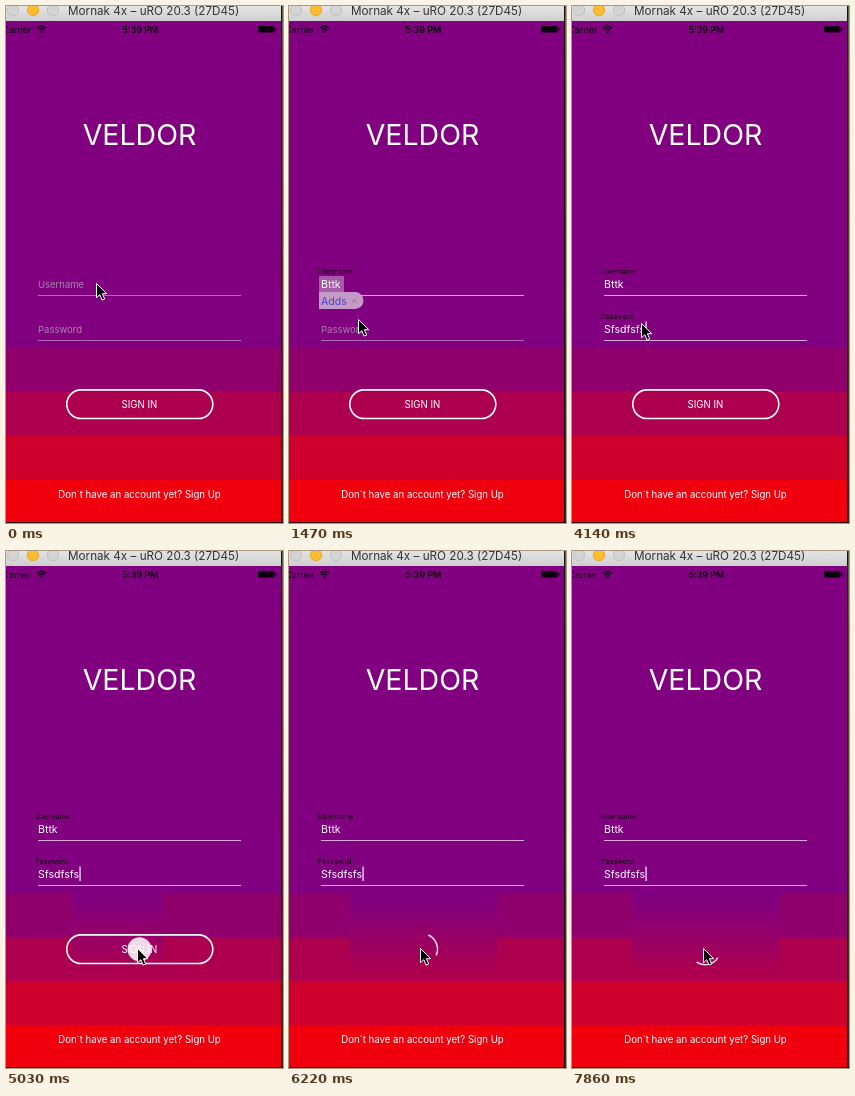
An HTML page that plays this animation: 277x517 px, repeating every 8 s.

```html
<!DOCTYPE html>
<html lang="en">
<head>
<meta charset="utf-8">
<title>Sign in</title>
<style>
html, body { margin: 0; width: 100%; height: 100%; overflow: hidden; background: #800080; }
svg { display: block; width: 277px; height: 517px; font-family: Inter, Roboto, sans-serif; }
text { fill: #fff; white-space: pre; }
.hint { font-size: 9.5px; fill: #a884a8; }
.tag { font-size: 7.3px; fill: #14000f; }
.value { font-size: 10.6px; }
.small { font-size: 9.65px; text-anchor: middle; }
.status { font-size: 9px; fill: #0c000c; }
.line { stroke: #b36bb3; }
.lit { stroke: #d9a9d9; }
.caret { fill: #f2e0f8; }
</style>
</head>
<body>
<svg viewBox="0 0 277 517">
  <defs>
    <linearGradient id="bar" x2="0" y2="1"><stop stop-color="#e4e4e4"/><stop offset="1" stop-color="#cfcfcf"/></linearGradient>
    <linearGradient id="blend" x2="0" y2="1"><stop offset=".1" stop-color="#800080"/><stop offset="1" stop-color="#ac004e"/></linearGradient>
    <linearGradient id="desk" x2="0" y2="1"><stop stop-color="#5c6a58"/><stop offset=".15" stop-color="#6a4a2c"/><stop offset="1" stop-color="#3a2a1c"/></linearGradient>
  </defs>

  <rect width="277" height="517" fill="#800080"/>
  <g id="bands"></g>
  <rect id="patch" y="341" height="79" fill="url(#blend)"/>

  <rect width="275" height="15" fill="url(#bar)"/>
  <g stroke-width=".8">
    <circle cx="7" cy="4" r="5.7" fill="#d4d4d4" stroke="#b9b9b9"/>
    <circle cx="27" cy="4" r="5.7" fill="#fdbd2e" stroke="#dfa023"/>
    <circle cx="47" cy="4" r="5.7" fill="#d4d4d4" stroke="#b9b9b9"/>
  </g>
  <text x="62" y="9" font-size="11.7" style="fill:#333">Mornak 4x – uRO 20.3 (27D45)</text>
  <rect x="275" width="1" height="517" fill="#1a1114"/>
  <rect x="276" width="1" height="517" fill="url(#desk)"/>
  <rect y="516" width="277" height="1" fill="#2a0508"/>

  <text class="status" x="-4" y="26.5">Carrier</text>
  <g fill="none" stroke="#0c000c" stroke-width="1.4">
    <path d="M31.2 22.2Q35.5 18.4 39.8 22.2M32.9 24.2Q35.5 22 38.1 24.2"/>
    <circle cx="35.5" cy="26" r=".6"/>
  </g>
  <text class="status" x="134.3" y="26.5" text-anchor="middle" font-weight="600">5:39 PM</text>
  <rect x="252" y="20" width="16.5" height="6.6" rx="1.4" fill="#0c000c"/>
  <rect x="269.2" y="22" width="1.2" height="2.6" rx=".6" fill="#0c000c"/>

  <text x="133.5" y="139" font-size="28.5" text-anchor="middle">VELDOR</text>

  <g id="user">
    <text class="hint" x="32" y="281.5">Username</text>
    <text class="tag" x="28.8" y="268.3">Username</text>
    <path class="line" d="M32 289.5H235"/><path class="lit"/>
    <rect id="mark" x="30" y="270" width="25" height="16" fill="#a45aa6"/>
    <text class="value" x="32" y="282"></text>
    <rect class="caret" y="270.5" width="1.3" height="14.5"/>
  </g>
  <g id="pass">
    <text class="hint" x="32" y="326.5">Password</text>
    <text class="tag" x="28.8" y="313.3">Password</text>
    <path class="line" d="M32 334.5H235"/><path class="lit"/>
    <text class="value" x="32" y="327"></text>
    <rect class="caret" y="315.5" width="1.3" height="14.5"/>
  </g>

  <g id="popup">
    <path d="M30 286H66A8.5 8.5 0 0 1 66 303H30Z" fill="#c49ac6"/>
    <text class="value" x="32" y="298.5" style="fill:#4a43cf">Adds</text>
    <path d="M63 292.5l4.5 4.5m0-4.5l-4.5 4.5" stroke="#93739a" stroke-width=".9"/>
  </g>

  <rect id="button" y="383.9" height="28.6" rx="14.3" fill="#fff" stroke="#fff" stroke-width="1.6"/>
  <text id="label" class="small" x="133.4" y="401.8">SIGN IN</text>
  <circle id="ripple" cx="133.5" cy="398.2" fill="#fff"/>
  <path id="spinner" d="M133 382.7A15.5 15.5 0 0 1 148.5 398.2" fill="none" stroke="#f6dcec" stroke-width="1.5"/>
  <text class="small" x="133.5" y="492">Don`t have an account yet? Sign Up</text>

  <path id="mouse" d="M0 0V14.2L3.3 11.2L5.6 16.6L8.2 15.5L5.9 10.2H10.3Z" fill="#000" stroke="#fff" stroke-width="1"/>
</svg>
<script>
const LOOP = 8000;
const $ = id => document.getElementById(id);
const set = (el, attrs) => { for (const k in attrs) el.setAttribute(k, attrs[k]); };
const show = (el, alpha) => set(el, { opacity: +alpha });
const ramp = (t, a, b) => Math.min(1, Math.max(0, (t - a) / (b - a)));
const ease = p => p * p * (3 - 2 * p);
const mix = (a, b, p) => a + (b - a) * p;
const within = (t, a, b) => t >= a && t < b;

$('bands').innerHTML = ['#8f006c', '#ad004e', '#ce002c', '#f0000d']
  .map((c, i) => `<rect y="${342 + 44 * i}" width="277" height="44" fill="${c}"/>`).join('');

// Each stroke of typing: [time, characters shown]
const fields = [
  { id: 'user', y: 289.5, text: 'Bttk', keys: [[600, 1], [750, 2], [900, 3], [1040, 4]],
    lineAt: t => ramp(t, 560, 760),
    caretAt: t => within(t, 300, 1470) || within(t, 1770, 2200) },
  { id: 'pass', y: 334.5, text: 'Sfsdfsfs', keys: [[3090, 2], [3240, 3], [3390, 5], [3540, 7], [3690, 8]],
    lineAt: t => t < 3090 ? 0 : mix(.84, 1, ramp(t, 3090, 3240)),
    caretAt: t => within(t, 2650, 4440) || t >= 4840 && (t - 4840) % 1000 < 600 }
];
for (const f of fields)
  for (const part of ['hint', 'tag', 'lit', 'value', 'caret']) f[part] = $(f.id).querySelector('.' + part);

function drawField(f, t) {
  const count = f.keys.reduce((n, [at, shown]) => t >= at ? shown : n, 0);
  f.value.textContent = f.text.slice(0, count);
  show(f.hint, !count);
  show(f.tag, count > 0);
  show(f.caret, f.caretAt(t));
  set(f.caret, { x: 32.3 + (count ? f.value.getComputedTextLength() : 0) });
  set(f.lit, { d: `M32 ${f.y}H${mix(32, 235, f.lineAt(t))}` });
}

// Pointer moves: [start, end, x, y]
const moves = [[900, 1320, 69, 313], [2200, 2350, 69, 317], [4140, 4740, 131, 397]];

function drawMouse(t) {
  let x = 90, y = 277;
  for (const [a, b, toX, toY] of moves) {
    const p = ease(ramp(t, a, b));
    x = mix(x, toX, p);
    y = mix(y, toY, p);
  }
  set($('mouse'), { transform: `translate(${x + .5} ${y + .5})` });
}

function drawButton(t) {
  const shrink = ease(ramp(t, 5770, 6000));
  const width = mix(146, 28.6, shrink);
  set($('button'), {
    x: 133.8 - width / 2, width,
    'fill-opacity': .2 * ramp(t, 5180, 5480),
    opacity: 1 - ramp(t, 5920, 6070)
  });
  show($('label'), t < 5770);
  set($('ripple'), { r: Math.max(0, (t - 4860) * .07), opacity: t < 4860 ? 0 : .85 * (1 - ramp(t, 5030, 5330)) });
  show($('spinner'), t >= 6070);
  set($('spinner'), { transform: `rotate(${23 + (t - 6220) / 383.6 * 360} 133 398.2)` });
  const wide = t >= 5330;
  set($('patch'), { x: wide ? 60 : 66, width: wide ? 148 : 91, opacity: +(t >= 4890) });
}

function draw(now) {
  const t = now % LOOP;
  fields.forEach(f => drawField(f, t));
  const tip = t < 1470 ? 0 : 1 - ramp(t, 1620, 1910);
  show($('popup'), tip);
  show($('mark'), tip);
  drawButton(t);
  drawMouse(t);
  requestAnimationFrame(draw);
}
requestAnimationFrame(draw);
</script>
</body>
</html>
```
